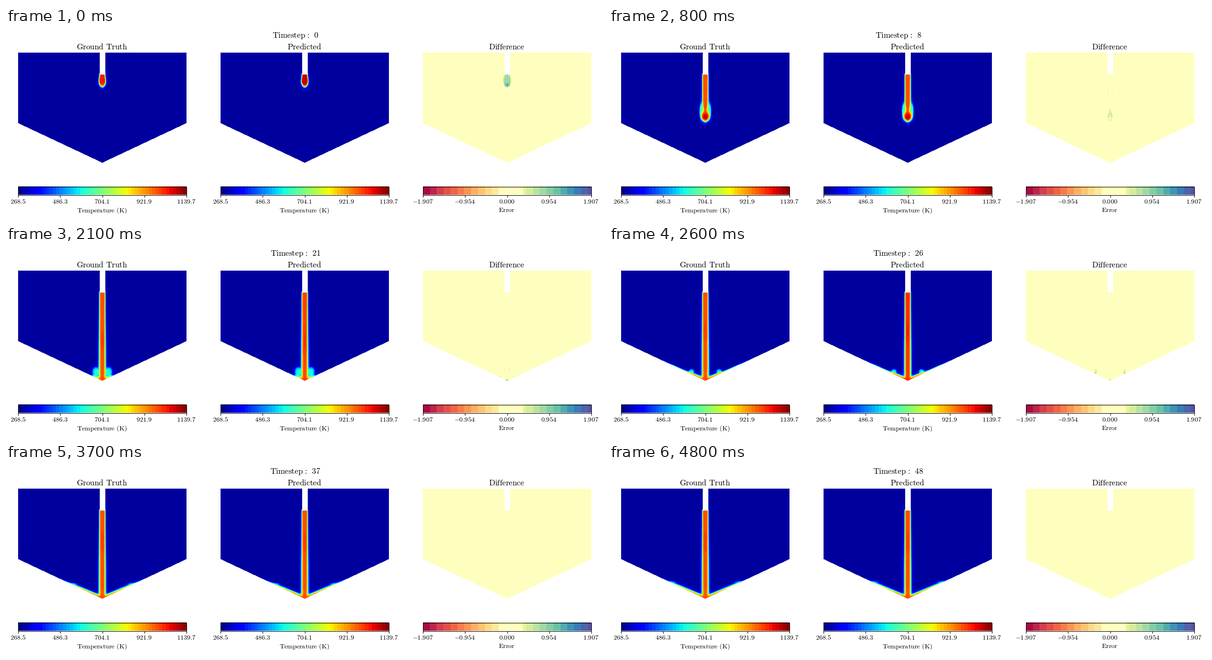
These frames come from a looping animation (1280x409 px, 4.9 s). A matplotlib script:

```python
import numpy as np
import matplotlib.pyplot as plt
from matplotlib.animation import FuncAnimation
from matplotlib.colors import ListedColormap
from matplotlib.patches import Rectangle

W, H, DPI = 1280, 409, 100
STEPS = 49
PANEL_W, TOP, APEX = 361, 53, 290
LEFTS = [26, 460, 894]
SLOPE = 0.4724
T_MIN, T_MAX, E_MAX = 268.5, 1139.7, 1.907
BIG, SMALL = 12.4, 10.2

plt.rcParams["mathtext.fontset"] = "cm"

# Vortex pair: step, x offset, y, x radius, y radius, strength
VORTEX = np.array([
    [0, 5.0, 114, 2.0, 6, 0.00],
    [4, 7.5, 142, 4.0, 10, 0.42],
    [8, 8.3, 179, 4.2, 17, 0.47],
    [14, 8.3, 226, 4.2, 24, 0.40],
    [17, 9.0, 252, 5.0, 18, 0.40],
    [21, 14.0, 271, 7.0, 10, 0.42],
    [26, 29.5, 270, 5.5, 5, 0.38],
    [32, 46.0, 265, 6.0, 3, 0.20],
    [40, 70.0, 254, 8.0, 2.5, 0.15],
])

x = np.arange(PANEL_W) + 0.5 - PANEL_W / 2
y = np.arange(TOP, APEX) + 0.5
X, Y = np.meshgrid(x, y)
A = np.abs(X)
WALL = APEX - SLOPE * A
D = (WALL - Y) * 0.904
OUTSIDE = Y > WALL


def sig(z):
    return 1 / (1 + np.exp(-np.clip(z, -60, 60)))


def spot(cx, cy, rx, ry):
    return np.exp(-((A - cx) / rx) ** 2 - ((Y - cy) / ry) ** 2)


def radius(cx, cy, rx, ry):
    return np.hypot((A - cx) / rx, (Y - cy) / ry)


def tip(n):
    return 128 + 8.79 * n + 0.073 * n * n


def vortex(n):
    return [np.interp(n, VORTEX[:, 0], col) for col in VORTEX[:, 1:].T]


def temperature(n, predicted):
    yt = tip(n)
    vx, vy, rx, ry, amp = vortex(n)
    falling = sig((16.5 - n) / 0.7)
    depth = np.clip((Y - 100) / 190, 0, 1)

    # free jet, pinched between the vortices
    pinch = 2.7 * falling * min(n / 6, 1) * np.exp(-((Y - vy - 2) / 12) ** 2)
    span = sig((yt - 9 - Y) / 1.5) * sig((Y - 98) / 0.8)
    jet = span * sig((6.4 - pinch - A) / (0.75 + 0.45 * depth))
    halo = 0.14 * span * sig(10 - A) * np.clip((Y - 130) / 100, 0, 1)

    # cap at the tip
    cap_w = np.interp(n, [0, 4, 14], [7.2, 8.7, 8.2])
    cap = sig((1 - radius(0, yt - 13, cap_w, 12)) / 0.13) * sig((Y - 98) / 0.8)

    pair = amp * sig((1 - radius(vx, vy, rx, ry)) / 0.16)

    # layer creeping up the sloping walls
    reach = 12 + 68 / (1 + np.exp(-(n - 23) / 0.9))
    thick = 0.3 + 0.7 * sig((vx + 5 - A) / 5)
    width = 4.6 * np.clip(1 - A / 95, 0, 1) * thick
    layer = np.clip((n - 16) / 3, 0, 1) * sig((reach - A) / 5)
    layer = layer * sig((width - D) / (0.5 + 0.8 * thick))

    heat = 1 - (1 - jet) * (1 - halo) * (1 - cap) * (1 - pair) * (1 - layer)

    # warmer patches inside the core
    glow = np.interp(n, [0, 8, 14, 17], [0, 95, 45, 0]) * spot(0, yt - 11, 7, 7)
    mid = np.interp(n, [14, 21, 30], [185, 205, 167])
    glow = glow + 24 * min(n / 12, 1) * spot(0, mid, 5, 20)
    glow = glow + np.interp(n, [0, 2], [45, 0])
    if predicted:
        glow = glow + np.interp(n, [0, 2], [65, 0])
        glow = glow + 28 * np.exp(-((n - 25) / 4) ** 2)
    return np.ma.array(300 + 692 * heat + glow * heat ** 4, mask=OUTSIDE)


def error(n):
    yt = tip(n)
    vx, vy = vortex(n)[:2]
    blob = sig((1 - radius(0, 113, 8.5, 15)) / 0.08) * (Y > 100)
    stripes = 0.8 + 0.28 * np.cos(1.5 * A) + 0.5 * spot(0, 123, 5, 4)
    e = max(1 - n / 2, 0) * blob * stripes

    # wedge riding behind the tip
    wedge = (Y > yt - 29) & (Y < yt - 10) & (A < 0.33 * (Y - yt + 29))
    wedge = wedge & ~((Y > yt - 15) & (A < 1.5))
    e = e + np.interp(n, [0, 1, 8, 11], [0, 0.62, 0.55, 0]) * wedge

    fade = np.interp(n, [3, 6, 9, 11], [0, 0.5, 0.5, 0])
    e = e - fade * (spot(2.5, yt - 5, 1, 4) + 0.65 * spot(4, 140, 1, 5))

    fade = np.interp(n, [10, 13, 15, 17], [0, 0.5, 0.5, 0])
    e = e + fade * (spot(1.5, yt - 1, 1.5, 4) + spot(5.5, yt - 21, 1.1, 4))

    fade = np.interp(n, [16, 18, 21, 24], [0, 0.6, 0.5, 0])
    e = e + 2.4 * fade * spot(0, 289, 4, 1.5) + fade * spot(14, 281, 3, 1.5)
    e = e - 0.62 * fade * spot(4, 266, 1, 8)

    fade = np.interp(n, [22, 25, 27, 31], [0, 0.58, 0.58, 0])
    e = e + fade * (spot(vx + 1, vy - 1, 2.5, 6) + spot(vx + 3, vy + 4, 4, 2))
    e = e + fade * spot(0, 288, 2, 4)

    late = np.clip((n - 30) / 4, 0, 1)
    px = np.interp(n, [37, 48], [30, 10])
    e = e + 0.38 * late * spot(px, APEX - SLOPE * px - 3, 4, 1.3)
    return np.ma.array(e, mask=OUTSIDE)


def banded(name, rule):
    base = plt.get_cmap(name)
    cmap = ListedColormap([base((rule(i) + 0.5) / 49) for i in range(49)])
    cmap.set_bad((1, 1, 1, 0))
    return cmap


heat_map = banded("jet", lambda i: i)
error_map = banded("Spectral", lambda i: 24 if 22 <= i <= 28 else i // 2 * 2 + 0.5)

fig = plt.figure(figsize=(W / DPI, H / DPI), dpi=DPI, facecolor="white")
ax = fig.add_axes([0, 0, 1, 1])
ax.axis("off")


def roman(s):
    return r"$\mathrm{" + s.replace(" ", r"\hspace{0.38}") + "}$"


def label(cx, base, s, size):
    return ax.text(cx, base, roman(s), fontsize=size, color="black",
                   ha="center", va="baseline")


def image(data, x0, top, bottom, cmap, lo, hi):
    return ax.imshow(data, extent=(x0, x0 + PANEL_W, bottom, top), cmap=cmap,
                     vmin=lo, vmax=hi, interpolation="nearest", aspect="auto")


def panel(x0, title, caption, data, cmap, lo, hi, fmt):
    cx = x0 + PANEL_W / 2
    img = image(data, x0, TOP, APEX, cmap, lo, hi)
    ax.add_patch(Rectangle((cx - 5.8, TOP - 1), 11.8, 48, fc="white", lw=0))
    image(np.arange(49)[None, :], x0, 341.5, 359.5, cmap, -0.5, 48.5)
    ax.add_patch(Rectangle((x0, 341.5), PANEL_W, 18, fill=False, ec="black", lw=0.8))
    for k, v in enumerate(np.linspace(lo, hi, 5)):
        tx = x0 + k * PANEL_W / 4
        ax.plot([tx, tx], [359.5, 364], color="black", lw=0.8)
        label(tx - 0.5, 378, fmt % v, SMALL)
    label(cx - 0.7, 46, title, BIG)
    label(cx - 0.7, 396.5, caption, SMALL)
    return img


kelvin = (heat_map, T_MIN, T_MAX, "%.1f")
truth = panel(LEFTS[0], "Ground Truth", "Temperature (K)", temperature(0, False), *kelvin)
guess = panel(LEFTS[1], "Predicted", "Temperature (K)", temperature(0, True), *kelvin)
diff = panel(LEFTS[2], "Difference", "Error", error(0), error_map, -E_MAX, E_MAX, "%.3f")
clock = label(620.5, 21, "", BIG)
ax.set_xlim(0, W)
ax.set_ylim(H, 0)


def draw(n):
    truth.set_data(temperature(n, False))
    guess.set_data(temperature(n, True))
    diff.set_data(error(n))
    clock.set_text(roman(r"Timestep\hspace{0.116}:\hspace{0.495}%d" % n))
    return truth, guess, diff, clock


anim = FuncAnimation(fig, draw, frames=STEPS, interval=100, repeat=True, repeat_delay=0)
plt.show()
```
